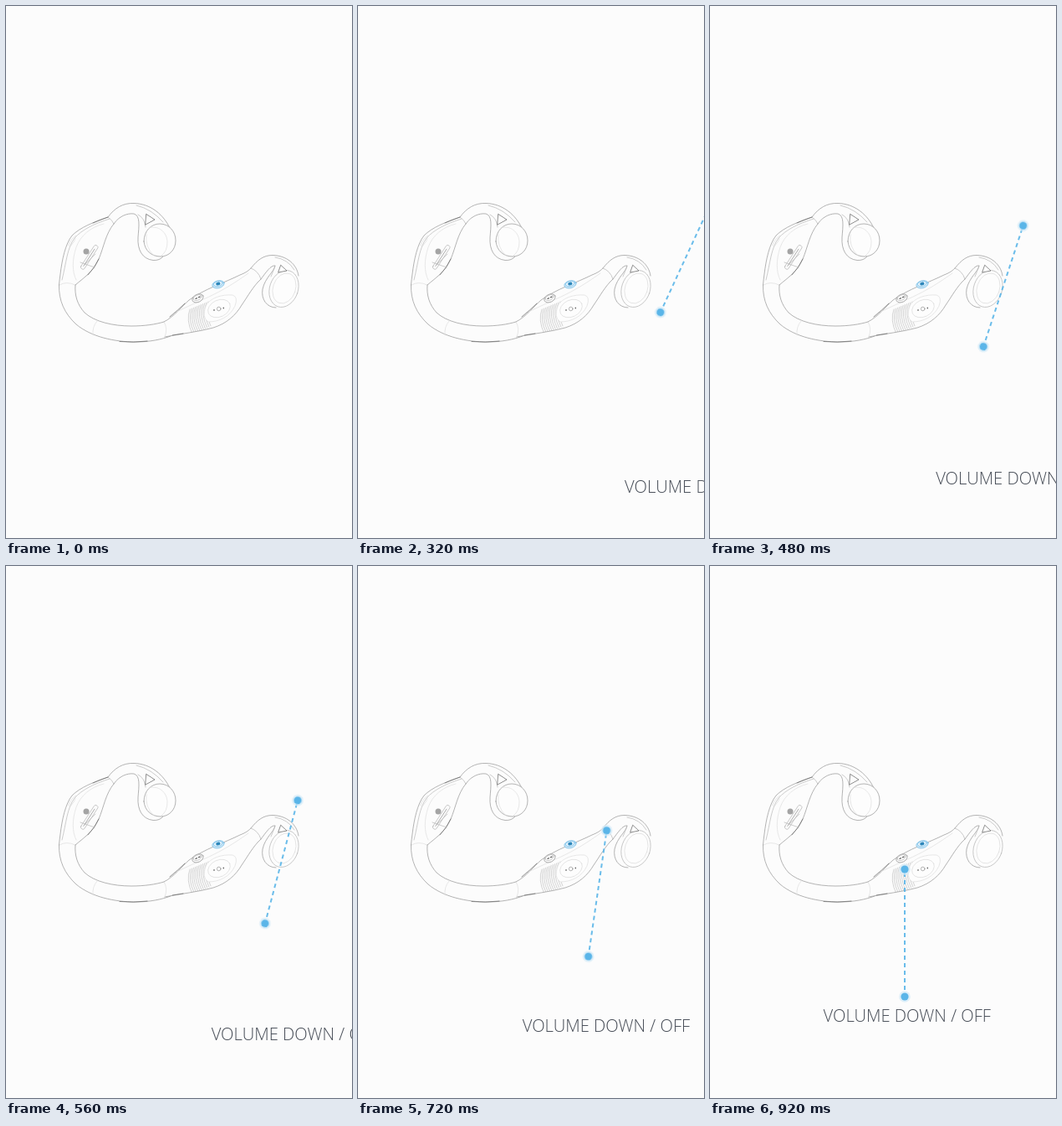
An HTML page for the animation above (1720 ms loop, 414 px wide and 635 px high).

```html
<!DOCTYPE html>
<html lang="en">
<head>
<meta charset="utf-8">
<title>Volume down / off</title>
<style>
  html, body { margin: 0; width: 100%; height: 100%; overflow: hidden; background: #fcfcfc; }
  svg { display: block; width: 414px; height: 635px; }
  .ink { fill: none; stroke: #949494; stroke-width: .7; stroke-linecap: round; stroke-linejoin: round; }
  .dark { stroke: #606060; }
  .mid { stroke: #b8b8b8; }
  .faint { stroke: #dedede; }
  .body { fill: #fdfdfd; }
  .label { font: 300 20.2px "Open Sans", "Noto Sans", sans-serif; fill: #454b55; }
</style>
</head>
<body>
<svg viewBox="0 0 414 635">
  <defs>
    <clipPath id="podClip">
      <path d="M189 377C201 371 210 359 219 351C237 338 262 330 280 321C288 318 291 315 293 313L305 326C296 334 289 347 282 357C275 369 264 379 248 384C230 389 210 391 190 395Z"/>
    </clipPath>
  </defs>

  <g class="ink">
    <!-- neck band -->
    <path d="M63.500 333C63 352 70 367 84 380C102 395 130 401 155 401C172 401 186 398 197 394"/>
    <path d="M83 333C82 345 85 356 94 366C106 377 128 382 150 382C166 382 179 380 189 377"/>
    <path class="dark" d="M136 400.500Q152 402 169 400"/>
    <path class="faint" d="M109 376Q103 383 104 393M64 333Q72 328 83 333"/>

    <!-- left pod -->
    <path d="M122 252C105 258 89 264 79 274C71 284 67 303 65 320Q64 327 63.500 333"/>
    <path d="M129 260C119 272 117 288 111 302C104 318 92 325 83 333"/>
    <path class="dark" d="M104 259Q113 255 122 252M111 302Q106 313 98 321"/>
    <path class="mid" d="M122 252Q127 255 129 260M124 254C105 260 91 267 82 277C73 289 72 307 67 327"/>
    <path class="faint" d="M117 260C101 264 89 274 84 288C79 303 79 317 84 327M75 285Q77 278 84 274Q83 281 77 287Z"/>
    <g transform="rotate(-57 99 300)">
      <rect class="mid" x="83" y="298" width="33" height="5" rx="2"/>
      <path d="M87 300.500H111"/>
    </g>
    <path class="mid" d="M89 306L106 312M93 310L107 296"/>
    <circle cx="96" cy="293" r="3.500" fill="#a4a4a4" stroke="none"/>

    <!-- left hook and ear pad -->
    <path d="M122 252C130 241 140 235 153 235.500C174 236 189 250 196 265"/>
    <path d="M129 260C135 251 145 247 153 248C161 250 159 263 158 276C157 291 163 302 176 303.500Q184 304 188 299"/>
    <path class="mid" d="M156 238Q174 242 188 258M158 249Q166 253 167 264"/>
    <path class="dark" d="M168 248.500L178 255L167 261Z"/>
    <path class="body" d="M165 281C165 268 174 260 184 260C195 260 203 269 203 280C203 291 195 299 185 299C174 299 166 292 165 281Z"/>
    <path class="faint" d="M171 265C182 261 193 270 193 282Q193 293 186 298M168 272Q166 288 177 298"/>

    <!-- right hook and ear pad -->
    <path d="M293 313C301 303 308 297.500 319 297.500C336 298 348 308 350 322"/>
    <path d="M305 326C311 318 317 309 322 310C321 317 310 324 307 338C305 350 312 360 323 360"/>
    <path class="mid" d="M293 313Q302 316 305 326M322 300Q337 302 345 315M322 310Q320 316 317 323"/>
    <ellipse class="body mid" cx="332.500" cy="337.500" rx="17" ry="22.500" transform="rotate(19 332.500 337.500)"/>
    <ellipse class="faint" cx="333" cy="337" rx="13.500" ry="18.500" transform="rotate(19 333 337)"/>
    <path class="body dark" d="M329 309.500L336 316L326 318Z"/>

    <!-- right pod -->
    <g id="grille" class="mid" clip-path="url(#podClip)" stroke-width=".6"></g>
    <path d="M189 377C201 371 210 359 219 351C237 338 262 330 280 321C288 318 291 315 293 313"/>
    <path d="M190 395C210 391 230 389 248 384C264 379 275 369 282 357C289 347 296 334 305 326"/>
    <path class="dark" d="M196 371Q206 363 214 355M199 393L212 391"/>
    <path class="faint" d="M189 377Q194 385 190 395M204 365Q221 357 243 347T290 319"/>
    <path class="faint body" d="M239 358C244 348 259 344 271 345Q278 347 274 358C268 371 255 377 242 377Q234 372 239 358Z"/>
    <ellipse class="faint" cx="255" cy="361" rx="14" ry="10" transform="rotate(-25 255 361)"/>
    <circle cx="254.700" cy="361.500" r="2.300"/>
    <path class="dark" d="M249 362.700V363.200M260.300 360.300V360.800" stroke-width="1.400"/>

    <!-- buttons -->
    <g transform="translate(229.500 348.800) rotate(-25)">
      <ellipse class="body" rx="7" ry="4.600"/>
      <ellipse class="mid" cy="-.8" rx="5.200" ry="3"/>
      <path class="dark" d="M-2.500 -.5H-1M1.500 -.5H3" stroke-width="1.300"/>
    </g>
    <g transform="translate(254 332.300) rotate(-14)">
      <ellipse rx="7.300" ry="4.400" fill="#cfe8f7" stroke="#74bce6"/>
      <ellipse cy="-.8" rx="5.500" ry="3" fill="#e4f3fc" stroke="#74bce6"/>
      <ellipse cy="-.8" rx="2.600" ry="1.900" fill="#2c86ba" stroke="none"/>
    </g>
  </g>

  <g id="pointer">
    <path d="M0 -76V76" stroke="#5ab5e8" stroke-width="1.800" stroke-dasharray="5 4" stroke-dashoffset="-4"/>
    <g id="ends"></g>
  </g>
  <text id="label" class="label" x="0" y="0">VOLUME DOWN / OFF</text>
</svg>
<script>
  const LOOP = 1720, TRAVEL = 920, STEP = 40;
  const $ = id => document.getElementById(id);

  let lines = "";
  for (let i = 0; i < 11; i++) {
    const x = 219 + i * 2.2, y = 362 - i * 0.9;
    lines += `<path d="M${x + 1} ${y}Q${x - 4} ${y + 13} ${x + 4} ${y + 29}"/>`;
  }
  $("grille").innerHTML = lines;

  $("ends").innerHTML = [-76, 76].map(y =>
    `<circle cy="${y}" r="6.8" fill="#d6ebf8" opacity=".8"/>` +
    `<circle cy="${y}" r="4.6" fill="#5ab5e8"/>`).join("");

  // Glide in equal ticks, then rest until the loop restarts.
  function glide(id, from, to) {
    $(id).animate([
      { transform: from, offset: 0, easing: `steps(${TRAVEL / STEP}, end)` },
      { transform: to, offset: TRAVEL / LOOP },
      { transform: to, offset: 1 }
    ], { duration: LOOP, iterations: Infinity });
  }

  const pose = (x, y, turn) => `translate(${x}px, ${y}px) rotate(${turn}deg)`;
  glide("pointer", pose(479.6, 221.3, 38.1), pose(233, 438, 0));
  glide("label", pose(417, 601, 0), pose(135.5, 543.5, 0));
</script>
</body>
</html>
```
